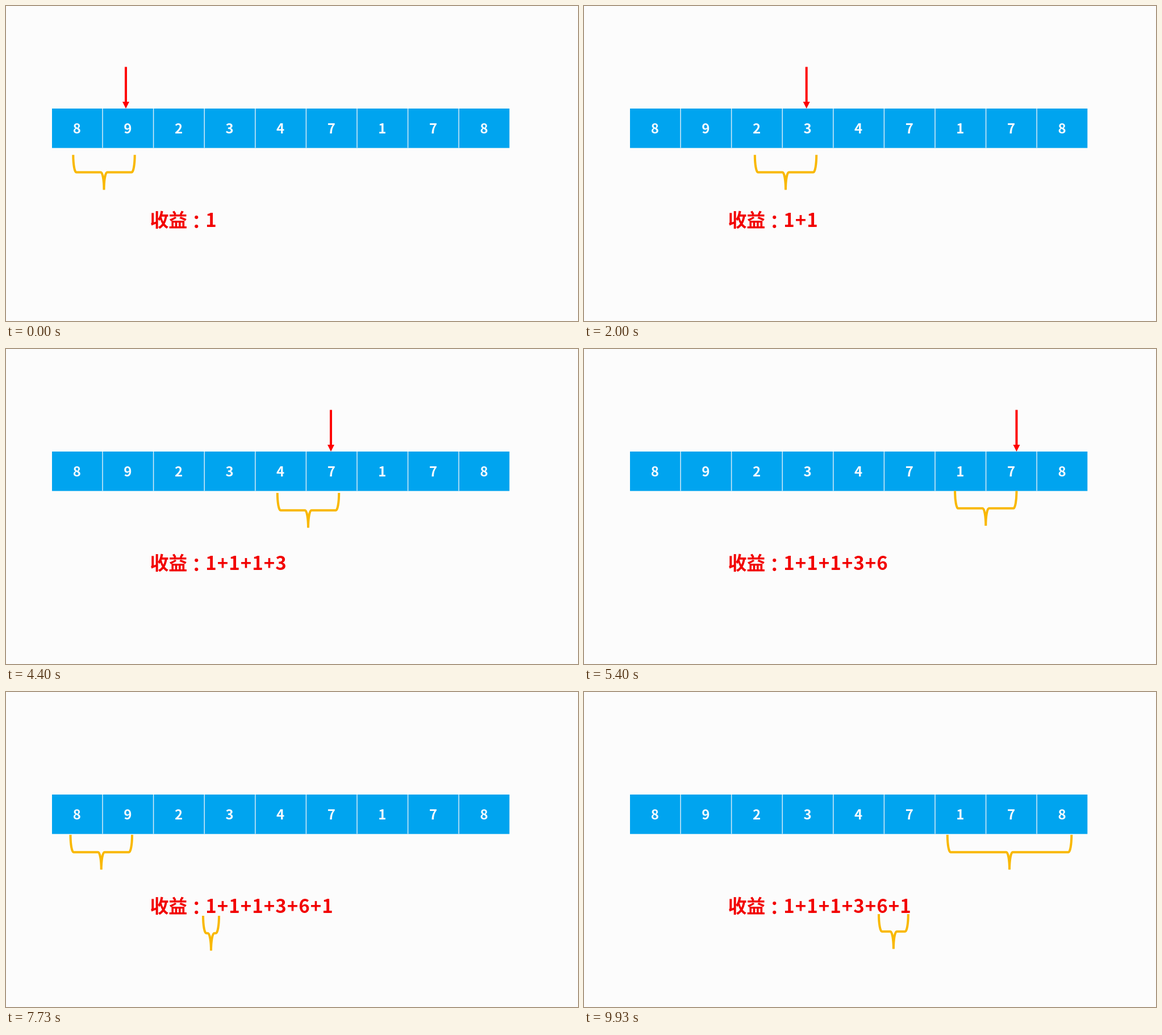
Write an HTML page that moves like this. It is 1007 by 556 pixels and loops after 9990 ms.

```html
<!DOCTYPE html>
<html lang="zh-CN">
<head>
<meta charset="utf-8">
<style>
html, body { margin: 0; width: 100%; height: 100%; overflow: hidden; background: #fcfcfc; }
svg { display: block; }
text { font-family: "Noto Sans CJK SC", "Noto Sans CJK", "Noto Sans CJK JP", sans-serif; font-weight: 700; text-anchor: middle; }
#cells rect { fill: #00a4ef; }
#cells path { stroke: #d8edf8; stroke-width: 1.5; }
#cells text { font-size: 24px; fill: #f4faff; }
#label text { font-size: 33px; fill: #f20000; }
.brace { fill: none; stroke: #f9b800; stroke-width: 4; }
#arrow { fill: #fe0000; }
</style>
</head>
<body>
<svg width="1007" height="556" viewBox="0 0 1007 556">
  <g id="cells"></g>
  <path id="arrow" d="M-2 107.5h4V169h4L0 181L-6 169h4z"/>
  <path id="main" class="brace"/>
  <path id="under" class="brace"/>
  <g id="label"></g>
</svg>
<script>
const LOOP = 9990, PITCH = 89.6, GAP = 70;
const $ = id => document.getElementById(id);

function add(parent, tag, attrs, text = '') {
  const el = document.createElementNS('http://www.w3.org/2000/svg', tag);
  for (const k in attrs) el.setAttribute(k, attrs[k]);
  el.textContent = text;
  parent.append(el);
  return el;
}

add($('cells'), 'rect', { x: 81, y: 181, width: 805.3, height: 69.6 });
[...'892347178'].forEach((d, i) => {
  if (i) add($('cells'), 'path', { d: `M${80.4 + PITCH * i} 181v69.6` });
  add($('cells'), 'text', { x: 124.8 + PITCH * i, y: 225 }, d);
});

add($('label'), 'text', { x: 270, y: 390 }, '收');
add($('label'), 'text', { x: 302.7, y: 390 }, '益');
const colon = add($('label'), 'text', { x: 335.3, y: 393 }, '：');
colon.style.fontFamily = '"Noto Sans CJK JP", "Noto Sans CJK", sans-serif';
const sum = [...'1+1+1+3+6+1'].map((c, i) =>
  add($('label'), 'text', { x: 361 + 20.5 * i, y: 390 }, c));

// Curly brace opening upwards, from x0 to x1
function brace([x0, x1, y]) {
  const rx = 5.5, ry = 30.8, mid = (x0 + x1) / 2;
  return `M${x0} ${y}a${rx} ${ry} 0 0 0 ${rx} ${ry}H${mid - rx}a${rx} ${ry} 0 0 1 ${rx} ${ry}` +
    `a${rx} ${ry} 0 0 1 ${rx} ${-ry}H${x1 - rx}a${rx} ${ry} 0 0 0 ${rx} ${-ry}`;
}

const span = (mid, y) => [mid - 54.2, mid + 54.2, y];

// at: previous marks vanish; new ones show after a short gap
const steps = [
  { at: -GAP, arrow: 211, main: span(172.5, 262.8), terms: 1 },
  { at: 1070, arrow: 301, main: span(264, 262.8), terms: 1 },
  { at: 1730, arrow: 391.7, main: span(355, 262.8), terms: 2 },
  { at: 2730, arrow: 476, main: span(442.6, 254), terms: 3 },
  { at: 3600, arrow: 572, main: span(532, 254), terms: 4 },
  { at: 4530, arrow: 662, main: span(622.5, 245.5), terms: 4 },
  { at: 5130, arrow: 761.5, main: span(707.3, 250.5), terms: 5 },
  { at: 6130, arrow: 842.3, main: span(809, 252), terms: 6 },
  { at: 7130, main: [113.5, 222, 252], under: [347, 375, 395], terms: 6 },
  { at: 8130, main: [294.7, 597.5, 252], under: [406.7, 484, 393.2], terms: 6 },
  { at: 9530, main: [639.8, 858.3, 252], under: [519, 570.8, 392], terms: 6 }
];

function draw(t) {
  const n = steps.findLastIndex(s => t >= s.at);
  const { at, arrow, main, under, terms } = steps[n];
  const on = t >= at + GAP;
  const show = (id, visible) => $(id).style.display = visible ? '' : 'none';
  show('arrow', on && arrow);
  show('main', on);
  show('under', on && under);
  if (arrow) $('arrow').setAttribute('transform', `translate(${arrow} 0)`);
  $('main').setAttribute('d', brace(main));
  if (under) $('under').setAttribute('d', brace(under));
  const count = n && t < at + 200 ? steps[n - 1].terms : terms;
  sum.forEach((el, i) => el.style.display = i < count * 2 - 1 ? '' : 'none');
}

function tick() {
  draw(performance.now() % LOOP);
  requestAnimationFrame(tick);
}
tick();
</script>
</body>
</html>
```
